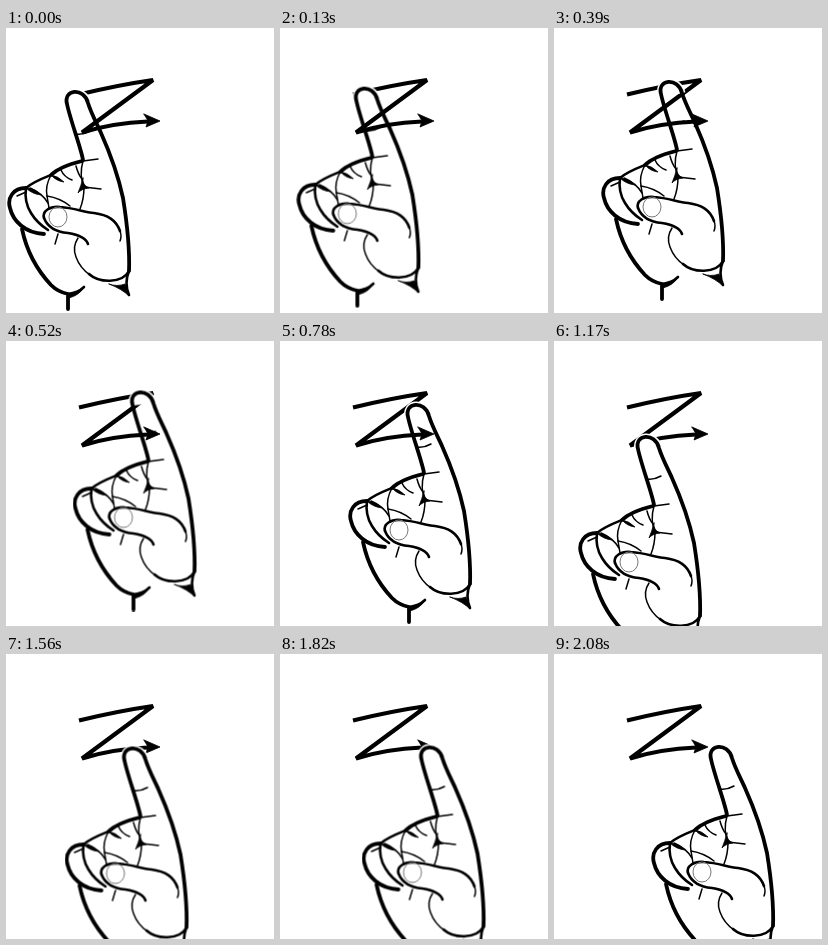
An HTML page for the animation above (2340 ms loop, 268x285 px).

```html
<!DOCTYPE html>
<html lang="en">
<head>
<meta charset="utf-8">
<title>Finger tracing Z</title>
<style>
  html, body { margin: 0; width: 100%; height: 100%; overflow: hidden; background: #fff; }
  svg { display: block; width: 100%; height: 100%; }
  path { fill: none; stroke: #000; stroke-linecap: round; stroke-linejoin: round; }
  .bold path { stroke-width: 3.8; }
  .mid path { stroke-width: 2.6; }
  .fine path { stroke-width: 1.5; }
  path.ink { fill: #000; stroke-width: .8; }
  path.halo { fill: #fff; stroke: #fff; stroke-width: 7; stroke-linecap: butt; }
  path.zed { stroke-width: 4.2; stroke-linecap: butt; stroke-linejoin: miter; }
  .nail { fill: none; stroke: #777; }
</style>
</head>
<body>
<svg viewBox="0 0 268 285">
  <path class="zed" d="M73 66.500Q112 57 147 52L76 104.500Q106 95 142 93.500"/>
  <path class="ink" d="M138 86L154 93L140 99L142 93Z"/>

  <g id="hand">
    <path class="halo" d="M61 77C57 61 78 59 82 75"/>

    <g class="bold">
      <path d="M77 132C75 120 64 91 61 76C57 61 78 59 82 75C85 85 91 96 95 105C104 125 112 147 117 170C121 195 124 218 123 243"/>
      <path d="M16 201C20 220 30 241 45 257Q52 264 62 266L62 281"/>
      <path d="M45 147C52 140 64 136 76 133"/>
      <path d="M20 160C7 160 1 170 4 180C7 193 19 205 38 206"/>
    </g>

    <g class="mid">
      <path d="M20 160C27 154 35 151 45 147"/>
      <path d="M20 160Q18 174 25 185Q31 195 42 202"/>
      <path d="M38 190C36 183 44 178 54 179C69 180 77 184 88 185C102 187 110 192 114 203"/>
      <path d="M38 190C42 200 50 204 62 205C74 207 80 210 82 216"/>
      <path d="M83 246C93 255 116 256 123 243"/>
      <path d="M62 266Q72 265 78 259"/>
      <path d="M123 243Q118 255 123 267"/>
    </g>

    <g class="fine">
      <path d="M70 106Q77 107 84 103"/>
      <path d="M77 133L92 131"/>
      <path d="M77 133Q73 147 78 159L95 161"/>
      <path d="M78 159Q78 171 74 181"/>
      <path d="M55 142Q58 149 66 152"/>
      <path d="M70 138Q72 146 76 151"/>
      <path d="M45 147Q39 158 41 168L43 180"/>
      <path d="M41 168Q54 170 64 178"/>
      <path d="M24 160Q36 165 42 175"/>
      <path d="M11 168L20 164"/>
      <path d="M72 210Q66 219 70 229Q74 240 84 247"/>
      <path d="M114 203Q116 208 114 213"/>
      <path d="M52 206L49 216"/>
    </g>
    <ellipse class="nail" cx="52" cy="189" rx="9" ry="10"/>

    <path class="ink" d="M45 147Q52 148 58 154Q50 153 45 147Z"/>
    <path class="ink" d="M20 160Q28 160 35 167Q26 166 20 160Z"/>
    <path class="ink" d="M77 150Q76 157 83 160Q75 161 72 165Q75 158 77 150Z"/>
    <path class="ink" d="M62 266Q72 265 78 259Q74 267 63 270Z"/>
    <path class="ink" d="M103 256Q111 259 119 256L123 268Q116 261 103 256Z"/>
  </g>
</svg>
<script>
const STEP = 130, COUNT = 18;
// Key points of the stroke: step, x, y. The hand hops evenly between them.
const keys = [
  [0, 0, 0], [3, 46, -10], [5, 85, -15], [6, 67, 0],
  [9, 23, 32], [15, 92, 29], [16, 96, 29], [COUNT, 96, 29]
];
const frames = keys.map(([step, x, y], i) => {
  const [next] = keys[i + 1] || [step + 1];
  return {
    transform: `translate(${x}px, ${y}px)`,
    offset: step / COUNT,
    easing: `steps(${next - step}, end)`
  };
});
document.getElementById("hand").animate(frames, { duration: STEP * COUNT, iterations: Infinity });
</script>
</body>
</html>
```
